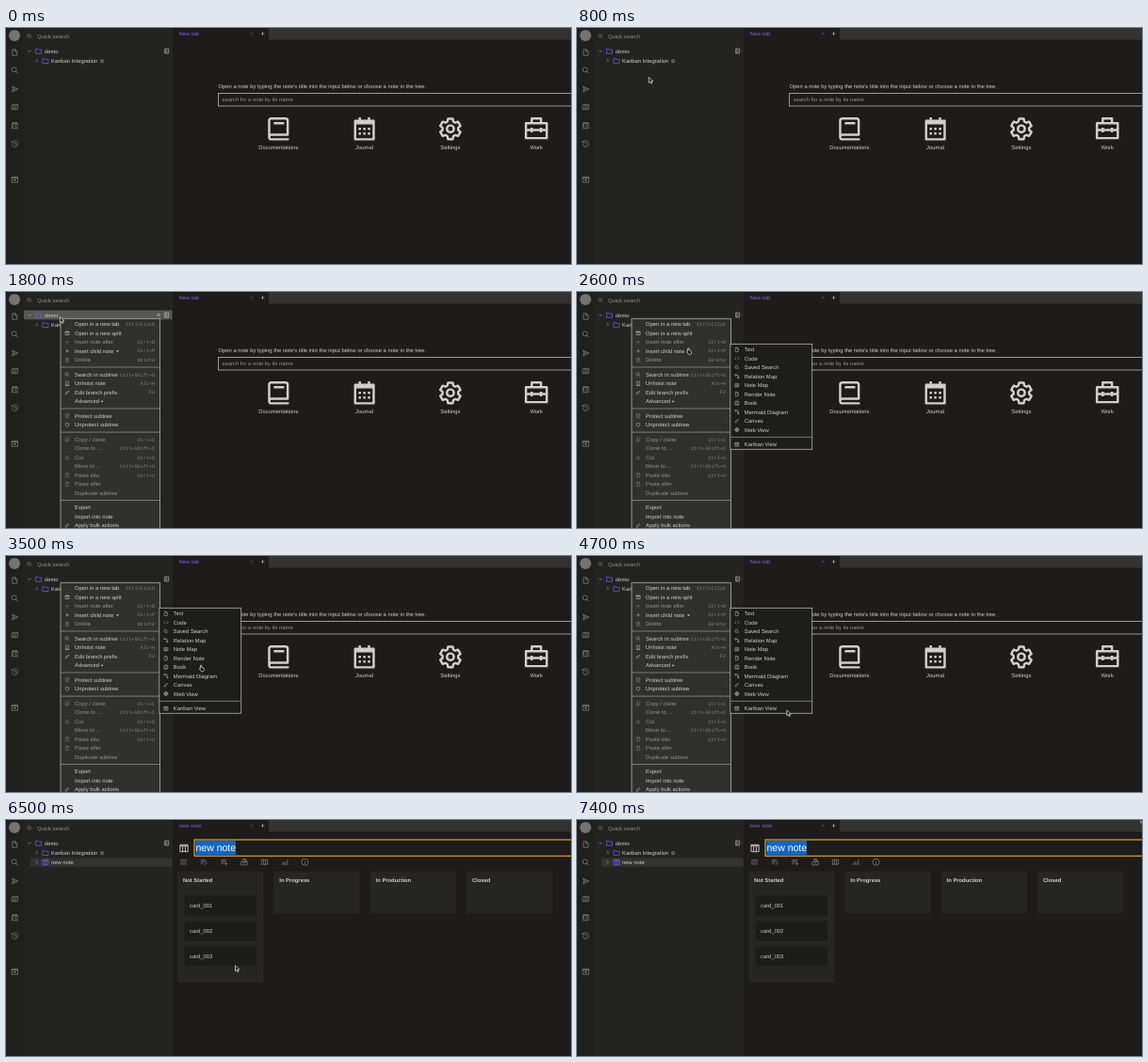
Write an HTML page that moves like this. It is 600 px wide and 251 px high and loops after 7900 ms.

```html
<!DOCTYPE html>
<html lang="en">
<head>
<meta charset="utf-8">
<title>Adding a board note</title>
<style>
  html, body { margin: 0; width: 100%; height: 100%; overflow: hidden; background: #1d1c1a; }
  svg { display: block; }
  text { font: 5.83px "Liberation Sans", Arial, sans-serif; fill: #cececc; white-space: pre; text-rendering: geometricPrecision; }
  .key { font: 5.15px "Liberation Mono", monospace; fill: #858583; text-anchor: end; }
  .mid { text-anchor: middle; }
  .bold { font-weight: bold; }
  .tab { fill: #8060ee; }
  .tilt { font-style: italic; }
  .dim { fill: #929290; }
  .title { font-size: 10.5px; fill: #fff; }
  .icon { fill: none; stroke-width: 2; stroke-linejoin: round; }
</style>
</head>
<body>
<svg id="stage" width="600" height="251" viewBox="0 0 600 251"></svg>
<script>
const LOOP = 7900, STEP = 100;
const GREY = '#858583', LIGHT = '#cfcfcc', PURPLE = '#7b5cf5';

// Icon outlines on a 24 unit grid
const ICONS = {
  file: 'M5 3h9l5 5v13H5zM13 3v6h6',
  search: 'M17 10a7 7 0 1 1-14 0a7 7 0 0 1 14 0M15 15l6 6',
  send: 'M4 4l17 8-17 8 3-8zM7 12h8',
  map: 'M3 6l6-2 6 2 6-2v14l-6 2-6-2-6 2zM9 4v14M15 6v14',
  calendar: 'M4 5h16v16H4zM4 7h16M8 2v4M16 2v4M7 12h2M11 12h2M15 12h2M7 16h2M11 16h2M15 16h2',
  history: 'M4 8a9 9 0 1 1-1 5M3 4v5h5M12 7v6h4',
  addBox: 'M3 5h18v16H3zM3 8h18M12 10v8M8 14h8',
  folder: 'M3 5h7l2 3h9v12H3z',
  panel: 'M5 3h15v18H5zM10 3v18M17 12h-4',
  split: 'M3 4h18v16H3zM12 4v16M3 7h18',
  table: 'M3 4h18v16H3zM3 7h18M9 8v12M15 8v12',
  star: 'M12 3l3 6 6 1-5 4 2 7-6-4-6 4 2-7-5-4 6-1z',
  plus: 'M12 4v16M4 12h16',
  cross: 'M6 6l12 12M18 6L6 18',
  right: 'M9 5l7 7-7 7',
  down: 'M5 9l7 7 7-7',
  trash: 'M5 7h14v14H5zM3 6h18M9 3h6M10 11v6M14 11v6',
  door: 'M6 3h12v18H6zM3 21h18M14 12h1',
  pen: 'M4 20l2-6L16 4l4 4L10 18z',
  shield: 'M12 3l8 3c0 8-3 12-8 15c-5-3-8-7-8-15z',
  copy: 'M8 3h12v13H8zM4 8v13h12',
  cut: 'M5 4l13 14M19 4L6 18M7 18a2 2 0 1 1-1-1M19 18a2 2 0 1 1-1-1',
  paste: 'M5 5h14v16H5zM9 3h6v4H9z',
  code: 'M8 6l-6 6 6 6M16 6l6 6-6 6',
  nodes: 'M3 3h6v6H3zM15 15h6v6h-6zM9 6h9v9',
  book: 'M21 21H6a2 2 0 0 1 0-4h14V5q0-2-2-2H6q-2 0-2 2v14M8 7h9',
  work: 'M3 7h18v13H3zM8 7V3h8v4M3 13h18M8 11v4M16 11v4',
  globe: 'M21 12a9 9 0 1 1-18 0a9 9 0 0 1 18 0M3 12h18M12 3q-7 9 0 18M12 3q7 9 0 18',
  sliders: 'M2 6h8M14 6h8M2 12h3M9 12h13M2 18h12M18 18h4M12 4v4M7 10v4M16 16v4',
  listCheck: 'M3 6h16M3 11h16M3 16h7M13 17l3 3 6-7',
  listPlus: 'M3 6h16M3 11h16M3 16h8M18 13v9M13 17h9',
  archive: 'M3 11h18v10H3zM5 7h14v4M8 3h8v4M9 15h6',
  chart: 'M5 14v7M10 10v11M15 12v9M20 4v17',
  info: 'M22 12a10 10 0 1 1-20 0a10 10 0 0 1 20 0M12 11v6M12 7v2'
};

const gear = () => {
  const at = (r, deg) => {
    const a = deg * Math.PI / 180;
    return (12 + r * Math.sin(a)).toFixed(2) + ' ' + (12 - r * Math.cos(a)).toFixed(2);
  };
  const teeth = [];
  for (let a = 0; a < 360; a += 60)
    teeth.push(at(6.8, a - 22), at(9.1, a - 13), at(9.1, a + 13), at(6.8, a + 22));
  return 'M' + teeth.join('L') + 'zM15 12a3 3 0 1 1-6 0a3 3 0 0 1 6 0';
};
ICONS.cog = gear();

const rect = (x, y, x2, y2, fill, more = '') =>
  `<rect x="${x}" y="${y}" width="${x2 - x}" height="${y2 - y}" fill="${fill}" ${more}/>`;
const text = (x, y, s, cls = '') => `<text x="${x}" y="${y + 2}" class="${cls}">${s}</text>`;
const icon = (name, x, y, size = 8, color = GREY) =>
  `<path class="icon" stroke="${color}" d="${ICONS[name]}" transform="translate(${x - size / 2} ${y - size / 2}) scale(${size / 24})"/>`;
const line = (x, x2, y) => rect(x, y - .4, x2, y + .4, '#8c8c8a');
const group = (id, body) => `<g id="${id}">${body}</g>`;
const caret = (x, y) => `<path d="M${x - 1.5} ${y - .8}h3l-1.5 1.8z" fill="${LIGHT}"/>`;

const launcher = () => [['file', 26], ['search', 45], ['send', 65], ['map', 84],
  ['calendar', 103.5], ['history', 123], ['addBox', 161]]
  .map(([name, y]) => icon(name, 9.3, y, 8.5)).join('');

const frame = () =>
  rect(0, 0, 177, 251, '#232322') + rect(0, 0, 19, 251, '#20201f') +
  rect(279, 0, 600, 12.5, '#333431') +
  '<circle cx="9" cy="8" r="6" fill="#747472"/>' + launcher() +
  icon('search', 25, 8.5, 5.5, '#a0a09e') + text(33, 9, 'Quick search', 'dim') +
  icon('cross', 261, 6, 5, PURPLE) + icon('plus', 272.5, 6, 6, '#ddd');

const tree = () =>
  icon('down', 25, 24.5, 5.5, LIGHT) + icon('folder', 34.5, 24.5, 8, PURPLE) + text(41, 25, 'demo') +
  icon('panel', 170.5, 24.5, 6.5, LIGHT) +
  icon('right', 32.5, 34.8, 5.5, LIGHT) + icon('folder', 42, 34.8, 8, PURPLE) +
  text(48, 35, 'Kanban Integration') + icon('star', 102, 35, 5, LIGHT);

const home = () =>
  text(183.5, 6, 'New tab', 'tab tilt') +
  text(225.5, 62, "Open a note by typing the note's title into the input below or choose a note in the tree.") +
  rect(225.5, 69.5, 610, 83, '#1d1c1a', 'stroke="#a5a5a2" stroke-width=".9"') +
  text(229.5, 76, 'search for a note by its name', 'dim') +
  [['book', 'Documentations'], ['calendar', 'Journal'], ['cog', 'Settings'], ['work', 'Work']]
    .map(([name, label], i) => {
      const x = 289.3 + i * 91.3;
      return icon(name, x, 107.3, 29.5, LIGHT) + text(x, 127, label, 'mid');
    }).join('');

// Each entry: icon, label, shortcut, dimmed; null draws a separator
const MENU = [
  ['', 'Open in a new tab', 'Ctrl+Click'], ['split', 'Open in a new split'],
  ['plus', 'Insert note after', 'Ctrl+O', 1], ['plus', 'Insert child note', 'Ctrl+P'],
  ['trash', 'Delete', 'Delete', 1], null,
  ['search', 'Search in subtree', 'Ctrl+Shift+S'], ['door', 'Unhoist note', 'Alt+H'],
  ['pen', 'Edit branch prefix', 'F2'], ['', 'Advanced'], null,
  ['shield', 'Protect subtree'], ['shield', 'Unprotect subtree'], null,
  ['copy', 'Copy / clone', 'Ctrl+C', 1], ['', 'Clone to ...', 'Ctrl+Shift+C', 1],
  ['cut', 'Cut', 'Ctrl+X', 1], ['', 'Move to ...', 'Ctrl+Shift+X', 1],
  ['paste', 'Paste into', 'Ctrl+V', 1], ['paste', 'Paste after', '', 1],
  ['', 'Duplicate subtree', '', 1], null,
  ['', 'Export'], ['', 'Import into note'], ['pen', 'Apply bulk actions']
];
const SUBMENU = [
  ['file', 'Text'], ['code', 'Code'], ['search', 'Saved Search'], ['nodes', 'Relation Map'],
  ['map', 'Note Map'], ['file', 'Render Note'], ['book', 'Book'], ['nodes', 'Mermaid Diagram'],
  ['pen', 'Canvas'], ['globe', 'Web View'], null, ['table', 'Kanban View']
];

const menu = (items, x, y, x2, y2, fill) => {
  let row = y + 6;
  let out = rect(x, y, x2, y2, fill, 'stroke="#b0b0ad" stroke-width=".8"');
  for (const item of items) {
    if (!item) {
      out += line(x, x2, row - 1.7);
      row += 6.15;
      continue;
    }
    const [name, label, key, dim] = item;
    if (name) out += icon(name, x + 7, row, 5.5, dim ? GREY : LIGHT);
    out += text(x + 15, row, label, dim ? 'dim' : '');
    if (key) out += text(158, row - .3, key, 'key');
    row += 9.47;
  }
  return out;
};

const column = (i, y2, label) => {
  const x = 182 + i * 102.3;
  return rect(x, 54.5, x + 91.5, y2, '#252523') + text(x + 6, 64, label, 'bold');
};
const cards = (y, bottom, short) =>
  column(0, bottom, 'Not Started') +
  ['In Progress', 'In Production', 'Closed'].map((s, i) => column(i + 1, short, s)).join('') +
  [1, 2, 3].map((n, i) => {
    const top = y + i * 27;
    return rect(189.5, top, 266, top + 21, '#1c1c1a') + text(195, top + 10.5, 'card_00' + n);
  }).join('');

const board = () =>
  rect(26, 40.3, 176.5, 49.8, '#323231') +
  icon('right', 32.5, 45, 5.5, LIGHT) + icon('table', 42, 45, 8, PURPLE) + text(48, 45.2, 'new note') +
  icon('table', 189, 30, 11, LIGHT) +
  rect(200, 21, 610, 38.3, '#1d1c1a', 'stroke="#d09a30" stroke-width="1.3"') +
  rect(201.3, 22, 244, 37.3, '#1266c4') + text(201.5, 31.4, 'new note', 'title') +
  ['sliders', 'listCheck', 'listPlus', 'archive', 'map', 'chart', 'info']
    .map((name, i) => icon(name, 188.5 + i * 21.5, 44.7, 8.5)).join('') +
  group('early', text(183.5, 6, 'new note', 'tab tilt') + cards(74.5, 173, 98.5) +
    rect(182, 163, 273.5, 173, '#212120') + rect(182, 162.7, 273.5, 163.3, '#2c2c2a')) +
  group('settled', text(183.5, 6, 'new note', 'tab') + cards(80.5, 173, 99.5));

const pointer = body =>
  `<g fill="#111" stroke="#f2f2f2" stroke-width=".8" stroke-linejoin="round" transform="scale(.85)">${body}</g>`;

stage.innerHTML = frame() +
  group('hoverChild', rect(26, 30.3, 176.5, 39.5, '#575756') + icon('plus', 170.5, 34.8, 6, LIGHT)) +
  group('hoverRoot', rect(19, 19.5, 176.5, 29.3, '#575756') + icon('plus', 162, 24.5, 6, LIGHT)) +
  tree() + group('home', home()) + group('board', board()) +
  group('menu', menu(MENU, 58, 28.3, 163.5, 260, '#30302e') + caret(118.5, 63) + caret(102, 116.5)) +
  group('submenu', menu(SUBMENU, 162.8, 55.3, 249.7, 167.3, '#1d1d1c')) +
  group('cursor',
    group('arrow', pointer('<path d="M.4 .4v7l1.7-1.5 1.2 2.5 1.2-.6-1.2-2.4h2.3z"/>')) +
    group('hand', pointer('<path d="M1.6 4.8V1.2q.8-1.2 1.6 0v2.4q2.8 0 3 1.6v1.6q-.3 1.6-1.2 1.8h-2.2q-1-1-2.4-3.6q.4-.9 1.2-.2z"/>')));

// Spans of time in which each part is shown
const SHOWN = {
  hoverChild: [[1000, 1500]],
  hoverRoot: [[1500, 2300]],
  menu: [[1700, 5700]],
  submenu: [[2500, 5700]],
  home: [[0, 5700]],
  board: [[5700, LOOP]],
  early: [[5700, 5900]],
  settled: [[5900, LOOP]],
  cursor: [[100, LOOP]],
  hand: [[900, 1500], [2400, 4700]],
  arrow: [[0, 900], [1500, 2400], [4700, LOOP]]
};

// Cursor stops: time, x, y
const PATH = [
  [100, 150, 243], [800, 76, 52], [1200, 58, 32], [1400, 57, 27], [2000, 57, 26],
  [2500, 116, 59], [2800, 117, 59], [3600, 209, 118], [4100, 222.5, 163.5],
  [6400, 222.5, 163.5], [7100, 595, 0], [7200, 595, 0], [7400, 598.5, -3]
];

const cursorAt = t => {
  const next = PATH.findIndex(stop => stop[0] > t);
  if (next < 1) return (next ? PATH[PATH.length - 1] : PATH[0]).slice(1);
  const [t0, x0, y0] = PATH[next - 1], [t1, x1, y1] = PATH[next];
  const u = (t - t0) / (t1 - t0), k = u * u * (3 - 2 * u);
  return [x0 + (x1 - x0) * k, y0 + (y1 - y0) * k];
};

const byId = id => document.getElementById(id);

function draw() {
  const t = Math.floor(performance.now() % LOOP / STEP) * STEP;
  for (const id in SHOWN) {
    const on = SHOWN[id].some(([from, to]) => t >= from && t < to);
    byId(id).style.display = on ? '' : 'none';
  }
  byId('cursor').setAttribute('transform', `translate(${cursorAt(t)})`);
  requestAnimationFrame(draw);
}
draw();
</script>
</body>
</html>
```
